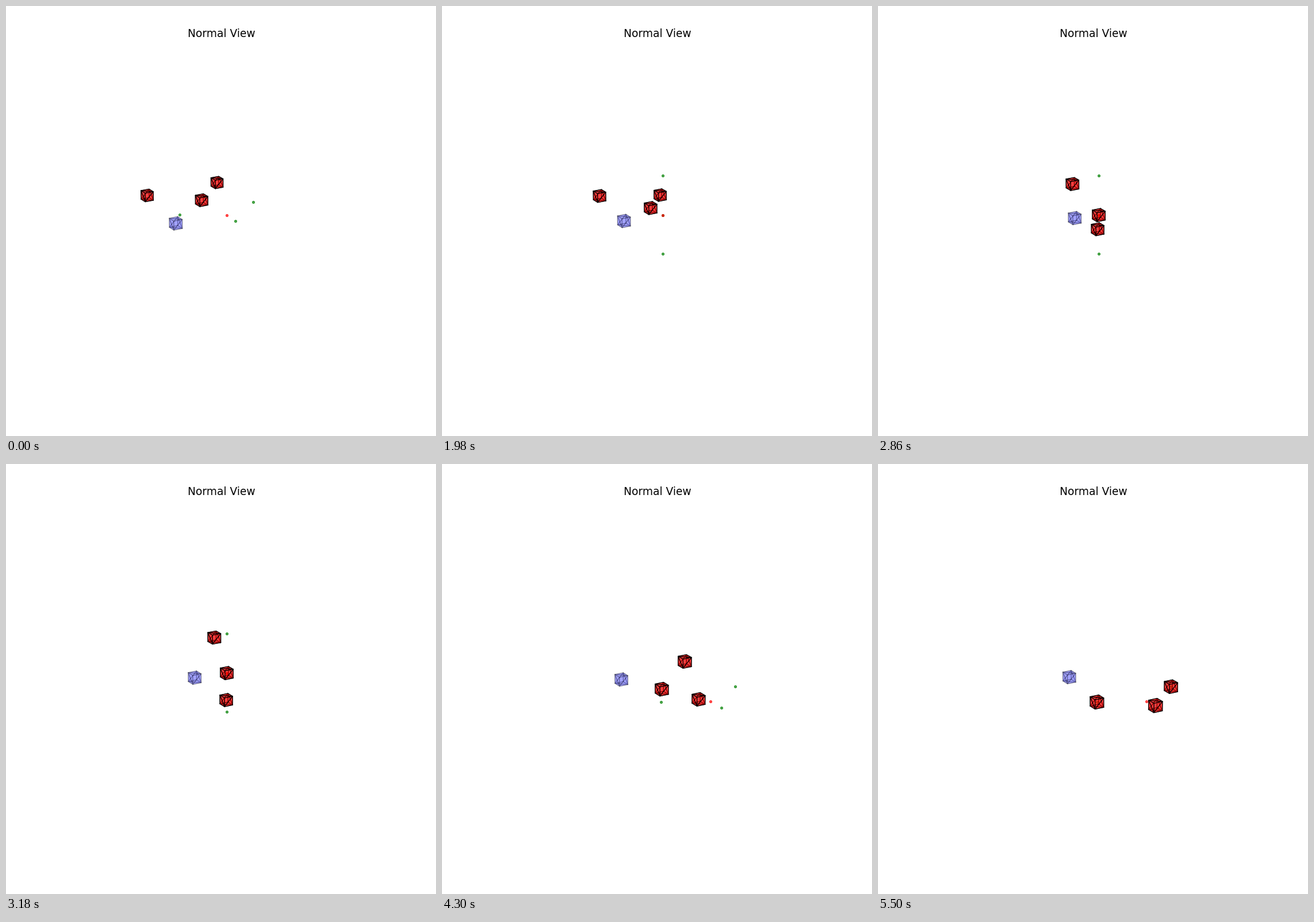
Recreate the animation shown at these times as a matplotlib script. Size 748 px wide and 748 px high, loop 7.08 s.

```python
import math

import matplotlib.pyplot as plt
import numpy as np
from matplotlib.animation import FuncAnimation
from matplotlib.collections import PolyCollection

SIZE, DPI = 748, 88
TICK, LOOP = 20, 7080
START, STEP, LAST = 1580, 80, 50
PX = 72 / DPI

# Perspective camera: azimuth -30, elevation 20, screen y pointing down
AZ, EL = math.radians(30), math.radians(20)
RIGHT = np.array([math.sin(AZ), math.cos(AZ), 0])
TOWARD = np.array([math.cos(AZ) * math.cos(EL), -math.sin(AZ) * math.cos(EL), math.sin(EL)])
DOWN = np.cross(RIGHT, TOWARD)
DOWN *= -np.sign(DOWN[2])
ORIGIN, DISTANCE = np.array([384, 363.7]), 2600

# Cube split into triangles, faces listed from back to front
EDGE = 16.4
CORNERS = EDGE * np.array([(x, y, z) for x in (-.5, .5) for y in (-.5, .5) for z in (-.5, .5)])
FACES = [(0, 4, 6, 2), (0, 1, 3, 2), (3, 7, 6, 2),
         (1, 5, 7, 3), (4, 5, 7, 6), (1, 5, 4, 0)]
TRIS = np.array([t for a, b, c, d in FACES for t in ((a, b, c), (a, c, d))])

# Two formations of three drones, and the centres they visit
GAP, SPEED = 72.5, 7.95
WEDGE = GAP * np.array([(-.54, -1, 0), (.45, 0, 0), (-.54, 1, 0)])
COLUMN = GAP * np.array([(0, 0, 1), (0, 0, 0), (0, 0, -1)])
HOME, MID, END = (np.array([x, 0, 0]) for x in (-122.5, 0, 158.7))
TO_COLUMN, TO_END = 3, 25
TURN = -0.05

PATROL_FROM, PATROL_STEPS = np.array([-7.7, -96.4, 0]), 15.15


def project(points):
    points = np.asarray(points, float)
    scale = 1 / (1 - points @ TOWARD / DISTANCE)
    flat = np.stack([points @ RIGHT, points @ DOWN], axis=-1)
    return ORIGIN + flat * scale[..., None]


def spin(points, angle):
    c, s = math.cos(angle), math.sin(angle)
    return points @ np.array([[c, s, 0], [-s, c, 0], [0, 0, 1]])


def goals(step):
    if step < TO_COLUMN:
        return MID, MID + spin(WEDGE, TURN * (step + 1))
    if step < TO_END:
        return MID, MID + COLUMN
    # The top drone takes the tip of the wedge
    return END, END + WEDGE[[1, 0, 2]]


def fly():
    spots = [HOME + WEDGE]
    for step in range(LAST):
        gap = goals(step)[1] - spots[-1]
        dist = np.linalg.norm(gap, axis=1, keepdims=True)
        spots.append(spots[-1] + gap * np.minimum(1, SPEED / np.maximum(dist, 1e-9)))
    return spots


def patrol(step):
    phase = step % (2 * PATROL_STEPS)
    done = min(phase, 2 * PATROL_STEPS - phase)
    return PATROL_FROM + np.array([0, SPEED / 2 * done, 0])


def cube(face, edge, z):
    art = PolyCollection([], facecolors=[face], edgecolors=[edge],
                         linewidths=1.35 * PX, zorder=z)
    return ax.add_collection(art, autolim=False)


def place(art, spot):
    art.set_verts(project(spot + CORNERS)[TRIS])


def dots(color):
    return ax.plot([], [], "o", color=color, alpha=0.7, ms=4.2 * PX,
                   mew=0.9 * PX, zorder=1)[0]


fig = plt.figure(figsize=(SIZE / DPI, SIZE / DPI), dpi=DPI, facecolor="white")
ax = fig.add_axes([0, 0, 1, 1])
ax.set_xlim(0, SIZE)
ax.set_ylim(SIZE, 0)
ax.axis("off")
ax.text(SIZE / 2 + 0.5, 53.6, "Normal View", family="DejaVu Sans",
        fontsize=18.67 * PX, ha="center", va="baseline", color="black")

goal_dots, center_dot = dots("green"), dots("red")
drones = [cube((1, 0, 0, 0.5), (0, 0, 0, 0.78), z) for z in (4, 2, 3)]
obstacle = cube((0, 0, 1, 0.2), (0, 0, 0, 0.22), 5)
flight = fly()


def draw(i):
    step = min(max((i * TICK - START) // STEP + 1, 0), LAST)
    center, points = goals(step)
    goal_dots.set_data(*project(points).T)
    center_dot.set_data(*project([center]).T)
    for art, spot in zip(drones, flight[step]):
        place(art, spot)
    place(obstacle, patrol(step))
    return [goal_dots, center_dot, obstacle, *drones]


anim = FuncAnimation(fig, draw, frames=LOOP // TICK, interval=TICK,
                     repeat=True, repeat_delay=0)
plt.show()
```
